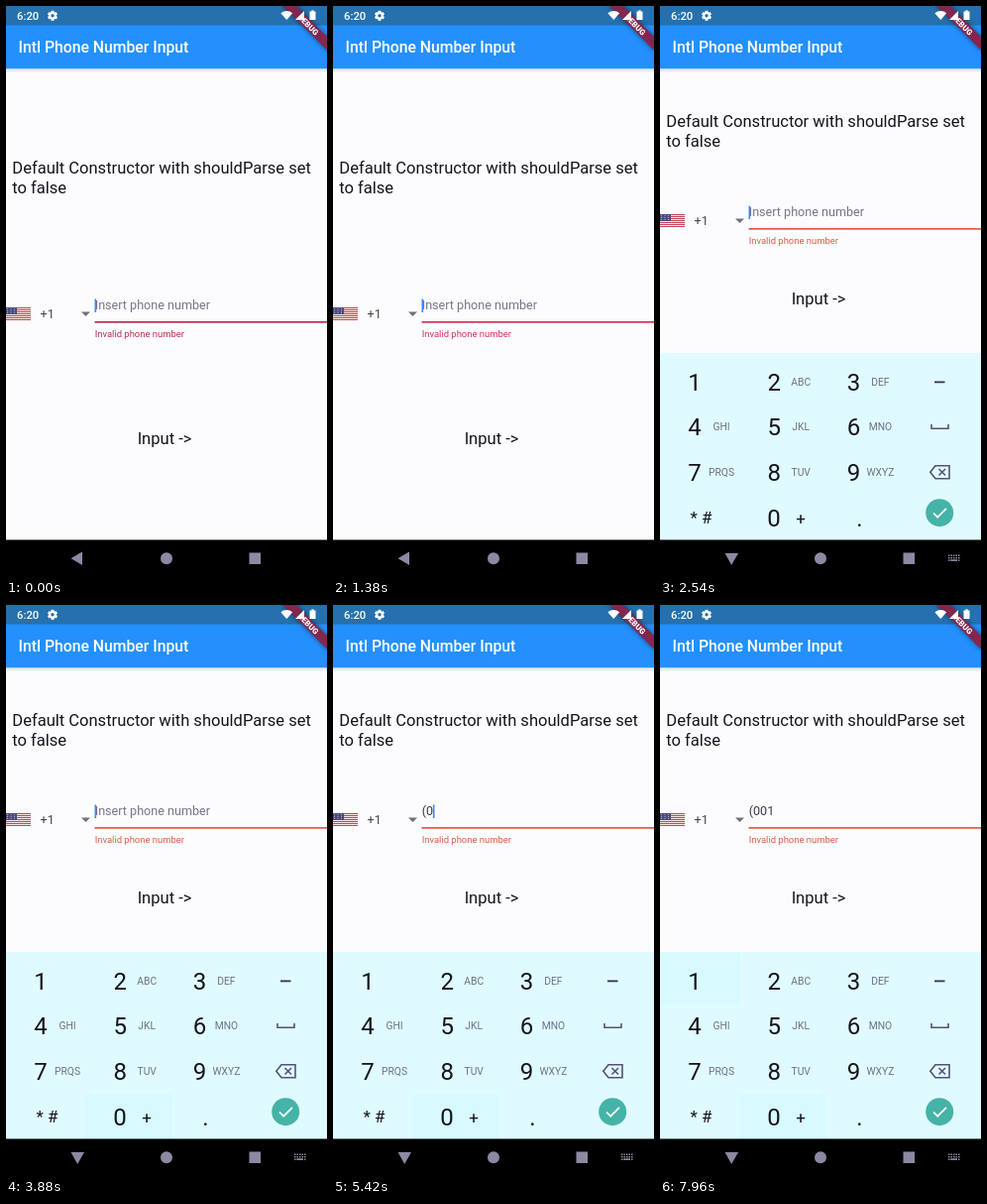
Write an HTML page with a canvas that moves like this. It is 324x576 px and loops after 8000 ms.

```html
<!DOCTYPE html>
<html lang="en">
<head>
<meta charset="utf-8">
<title>Intl Phone Number Input</title>
<style>
  html, body { margin: 0; width: 100%; height: 100%; overflow: hidden; background: #fcfcff; }
  canvas { display: block; width: 324px; height: 576px; }
</style>
</head>
<body>
<canvas id="stage" width="324" height="576"></canvas>
<script>
const ctx = document.getElementById('stage').getContext('2d');
const LOOP = 8000;
const OPEN = 2050, SLIDE = 200, KEYBOARD_HEIGHT = 188;
const TYPED = [[4150, '(0'], [5500, '(00'], [6000, '(001']];
const PRESSED = [[3800, 80, 493, 88, 45], [5950, 0, 350, 81, 53]];
const INK = '#14141c', NAV = '#8d89a3';

function rect(x, y, w, h, color) {
  ctx.fillStyle = color;
  ctx.fillRect(x, y, w, h);
}

function text(str, x, y, size, color, weight = 400, align = 'left') {
  ctx.font = `${weight} ${size}px Roboto, sans-serif`;
  ctx.textAlign = align;
  ctx.fillStyle = color;
  ctx.fillText(str, x, y);
}

// Text centred on a point by its capital height.
function label(str, x, y, size, color, weight) {
  text(str, x, y + size * 0.356, size, color, weight, 'center');
}

function polygon(color, ...points) {
  ctx.beginPath();
  points.forEach(([x, y]) => ctx.lineTo(x, y));
  ctx.closePath();
  ctx.fillStyle = color;
  ctx.fill();
}

function line(color, width, ...points) {
  ctx.beginPath();
  points.forEach(([x, y]) => ctx.lineTo(x, y));
  ctx.strokeStyle = color;
  ctx.lineWidth = width;
  ctx.stroke();
}

function circle(x, y, r, color) {
  ctx.beginPath();
  ctx.arc(x, y, r, 0, Math.PI * 2);
  ctx.fillStyle = color;
  ctx.fill();
}

function gear(x, y) {
  ctx.save();
  ctx.translate(x, y);
  for (let i = 0; i < 3; i++) {
    rect(-1.5, -5, 3, 10, '#fff');
    ctx.rotate(Math.PI / 3);
  }
  circle(0, 0, 3.8, '#fff');
  circle(0, 0, 1.7, '#2570ad');
  ctx.restore();
}

function debugRibbon() {
  ctx.save();
  ctx.translate(324, 0);
  ctx.rotate(Math.PI / 4);
  ctx.shadowColor = 'rgba(0,0,0,.5)';
  ctx.shadowBlur = 5;
  rect(-32, 22, 64, 9.5, '#84264e');
  ctx.shadowBlur = 0;
  label('DEBUG', 0, 26.8, 8, '#fff', 900);
  ctx.restore();
}

function header() {
  rect(0, 63, 324, 1.5, '#c3d3e8');
  rect(0, 64.5, 324, 2, '#e9eef8');
  rect(0, 0, 324, 20, '#2570ad');
  rect(0, 19.5, 324, 43.5, '#2490fe');
  text('Intl Phone Number Input', 12.5, 47, 15.75, '#fff', 500);
  text('6:20', 11, 14, 11.3, '#fff', 500);
  gear(47, 9.8);
  debugRibbon();
  ctx.beginPath();
  ctx.moveTo(283.3, 14);
  ctx.arc(283.3, 14, 9, -Math.PI * 0.73, -Math.PI * 0.27);
  ctx.fillStyle = '#fff';
  ctx.fill();
  polygon('#fff', [292, 14], [301, 14], [301, 5]);
  rect(306.5, 5.5, 6, 8.5, '#fff');
  rect(308.3, 4.3, 2.4, 1.5, '#fff');
}

function flag(y) {
  for (let i = 0; i < 13; i++) rect(0, y + i, 25, 1, i % 2 ? '#f5e6e6' : '#c04a55');
  rect(0, y, 11, 7, '#4a4a80');
  for (let i = 0; i < 9; i++) rect(1 + i % 3 * 3.5, y + 1 + Math.floor(i / 3) * 2, 1, 1, '#aeb0cc');
}

function content(t) {
  const open = t >= OPEN;
  const inset = open ? KEYBOARD_HEIGHT : 0;
  const titleY = 169 - inset / 4;
  const fieldY = 302 - inset / 2;
  const error = open ? '#de5a45' : t < 840 ? '#be2a50' : '#d92f5a';

  text('Default Constructor with shouldParse set', 6.3, titleY, 16.55, INK);
  text('to false', 6.3, titleY + 20, 16.55, INK);
  text('Input ->', 160, 442 - inset * 0.748, 16.55, INK, 400, 'center');

  flag(fieldY + 2);
  text('+1', 34.5, fieldY + 13, 12.6, '#45434c');
  polygon('#716f7b', [76, fieldY + 6.5], [85, fieldY + 6.5], [80.5, fieldY + 11]);

  const [typedAt, typed] = TYPED.filter(([at]) => t >= at).pop() || [open ? 2400 : 0, ''];
  text(typed || 'Insert phone number', 89.7, fieldY + 4.3, 12.6, typed ? '#3c3a45' : '#77768a');
  if (t < typedAt || (t - typedAt) % 1000 < 500) {
    const caretX = 89.5 + (typed ? ctx.measureText(typed).width : 0);
    rect(caretX, fieldY - 6.5, 1.6, 13.5, '#4285f4');
  }
  rect(89.5, fieldY + 16, 234.5, 1.7, error);
  text('Invalid phone number', 89.7, fieldY + 31.8, 9.45, error);
}

function keyboard(t) {
  const progress = Math.min(1, (t - OPEN) / SLIDE);
  ctx.save();
  ctx.translate(0, KEYBOARD_HEIGHT * (1 - progress) ** 2);
  rect(0, 350, 324, 189, '#e0fbff');
  for (const [at, x, y, w, h] of PRESSED) if (t >= at) rect(x, y, w, h, '#d7faff');

  ['', 'ABC', 'DEF', 'GHI', 'JKL', 'MNO', 'PRQS', 'TUV', 'WXYZ'].forEach((letters, i) => {
    const x = 35 + i % 3 * 80.2, y = 379 + Math.floor(i / 3) * 45.6;
    label(i + 1, x, y, 24, INK);
    label(letters, x + 27, y, 10.3, '#6c7086');
  });
  label('* #', 41.5, 516, 17, INK);
  label('0', 115, 516, 24, INK);
  label('+', 142, 516.5, 17, INK);
  label('.', 201.5, 516, 24, INK);

  const symbol = '#55517a';
  rect(277, 378.5, 10.5, 1.8, '#34324c');
  line(symbol, 1.6, [274, 422], [274, 426.2], [291, 426.2], [291, 422]);
  line(symbol, 1.6, [272.8, 470.3], [278, 463.8], [292, 463.8], [292, 476.8], [278, 476.8], [272.8, 470.3], [278, 463.8]);
  line(symbol, 1.6, [281.5, 467], [288, 473.5]);
  line(symbol, 1.6, [288, 467], [281.5, 473.5]);
  circle(282.2, 511.2, 14, '#45b3a7');
  line('#fff', 1.7, [276, 511.5], [280.2, 515.7], [289, 506.8]);
  ctx.restore();
}

function navigation(open) {
  rect(0, 538.5, 324, 37.5, '#000');
  if (open) {
    polygon(NAV, [65.5, 552], [79, 552], [72.2, 564]);
    for (let row = 0; row < 3; row++)
      for (let col = 0; col < 5; col++) rect(291 + col * 2.5, 553.5 + row * 2.5, 1.5, 1.5, NAV);
    rect(293.5, 558.5, 6.5, 1.5, NAV);
  } else {
    polygon(NAV, [65.5, 557.3], [77, 550.5], [77, 564]);
  }
  circle(162, 557.2, 6, NAV);
  rect(245.5, 551.5, 11.5, 11.5, NAV);
}

function draw(now) {
  const t = now % LOOP;
  const open = t >= OPEN;
  rect(0, 0, 324, 576, '#fcfcff');
  header();
  content(t);
  if (open) keyboard(t);
  navigation(open);
  requestAnimationFrame(draw);
}

const start = performance.now();
const tick = () => 0;
requestAnimationFrame(draw);
</script>
</body>
</html>
```
